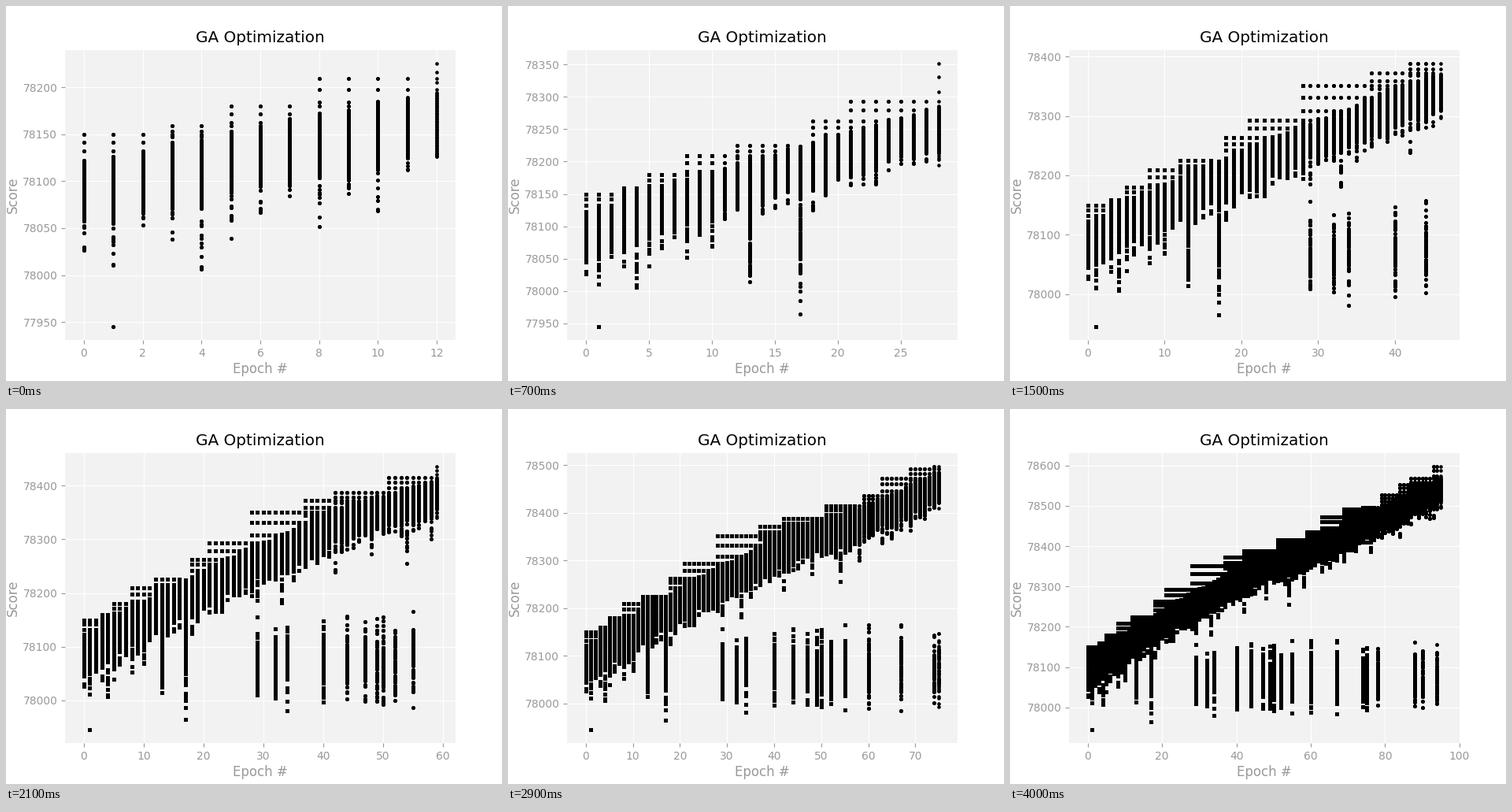
Write a matplotlib script that moves like this. It is 630x476 px and loops after 4100 ms.

```python
import numpy as np
import matplotlib.pyplot as plt
from matplotlib.animation import FuncAnimation

W, H, DPI = 630, 476, 100
FRAMES, INTERVAL = 41, 100
EPOCHS = 96
BASE = 78000          # all scores below are relative to this
LOWEST = -54.6        # single worst score, found in epoch 1
MARGIN = 0.0531
GREY = "#999999"
REDRAWS = 10          # repeated drawing hardens the edges of older dots
SQUARE_AGE = 18       # by this age the dots have become squares

# Key points as (epoch, score): top of the dense band, and new best scores
BAND_TOP = [(0, 122), (5, 153), (17, 225), (28, 285), (42, 357), (59, 413),
            (75, 485), (95, 572)]
RECORDS = [(0, 150), (3, 159), (5, 180), (8, 209), (12, 225), (18, 263),
           (21, 293), (28, 351), (37, 372), (42, 388), (51, 415), (59, 435.5),
           (63, 473), (69, 491.5), (74, 496.5), (79, 527), (84, 553),
           (87, 567.5), (93, 597)]

# Epochs that also hold a group of fresh, low-scoring candidates
RESTARTS = {13, 17, 29, 32, 34, 40, 44, 47, 49, 50, 52, 55, 60, 67, 74, 75,
            78, 88, 90, 94}

rng = np.random.default_rng(7)


def band_top(e):
    return np.interp(e, *zip(*BAND_TOP))


def make_elites():
    """Each record brings two runners-up between it and the band."""
    elites = []
    for e, best in RECORDS:
        gap = best - band_top(e)
        elites += [(e, best), (e, best - 0.3 * gap), (e, best - 0.65 * gap)]
    return elites


def epoch_scores(e, elites):
    best = max(s for start, s in RECORDS if start <= e)
    top = min(band_top(e) + rng.uniform(-3, 3), best)
    low = band_top(e) - 70 + 0.12 * e + rng.uniform(-7, 7)
    gap = 12 + min(rng.exponential(15 + 30 * np.exp(-e / 3)), 70)
    tail = low - gap * rng.random(3 + int(gap / 8)) ** 1.4
    kept = [s for start, s in elites if start <= e and s > top]
    parts = [np.arange(low, top, 1.2), tail, kept]
    if e == 1:
        parts.append([LOWEST])
    if e in RESTARTS:
        parts.append(rng.normal(72, 33, 70).clip(-40, 165))
    return BASE + np.concatenate(parts)


elites = make_elites()
scores = [epoch_scores(e, elites) for e in range(EPOCHS)]
xs = np.concatenate([np.full(len(s), e) for e, s in enumerate(scores)])
ys = np.concatenate(scores)

fig = plt.figure(figsize=(W / DPI, H / DPI), dpi=DPI, facecolor="white")
left, right, top, bottom = 75, 571, 55.6, 424.4
ax = fig.add_axes([left / W, 1 - bottom / H, (right - left) / W,
                   (bottom - top) / H], facecolor="#f2f2f2")
for spine in ax.spines.values():
    spine.set_visible(False)
ax.set_axisbelow(True)
ax.grid(color="white", linewidth=0.8)
ax.tick_params(colors=GREY, labelsize=10)
ax.ticklabel_format(useOffset=False, style="plain")
ax.set_title("GA Optimization", fontsize=14.4, color="black", pad=6.7)
ax.set_xlabel("Epoch #", fontsize=12, color=GREY, labelpad=2.8)
ax.set_ylabel("Score", fontsize=12, color=GREY, labelpad=2.8)

old_dots, = ax.plot([], [], "ks", ms=3.6, mew=0)
new_dots, = ax.plot([], [], "ko", ms=3.3, mew=0)


def padded(a, b):
    pad = MARGIN * (b - a)
    return a - pad, b + pad


def last_epoch(frame):
    # progress slows down as the population history grows
    return int(round(np.interp(frame, [1, 7, 15, 21, 29, 35, 40],
                               [12, 28, 46, 59, 75, 87, 95])))


def draw(frame):
    n = last_epoch(frame)
    age = n - xs
    old = age >= SQUARE_AGE
    old_dots.set_data(xs[old], ys[old])
    layers = [(age >= r) & ~old for r in range(REDRAWS)]
    new_dots.set_data(np.concatenate([xs[m] for m in layers]),
                      np.concatenate([ys[m] for m in layers]))
    shown = ys[age >= 0]
    ax.set_xlim(padded(0, n))
    ax.set_ylim(padded(shown.min(), shown.max()))
    return old_dots, new_dots


anim = FuncAnimation(fig, draw, frames=FRAMES, interval=INTERVAL,
                     repeat=True, repeat_delay=0, blit=False)
plt.show()
```
